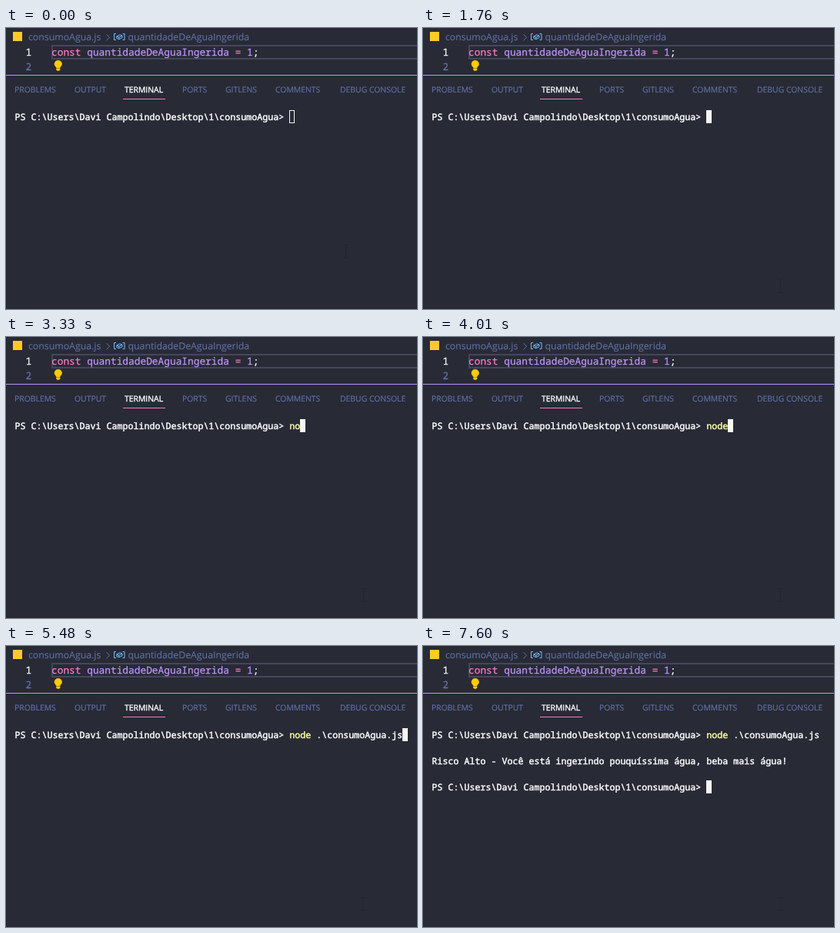
These frames come from a looping animation (534x366 px, 8000 ms). An HTML page:

```html
<!DOCTYPE html>
<html lang="pt">
<head>
<meta charset="utf-8">
<title>Terminal</title>
<style>
  html, body { margin: 0; width: 100%; height: 100%; overflow: hidden; background: #282a36; }
  svg { display: block; width: 534px; height: 366px; color: #f8f8f2; }
  text { white-space: pre; text-rendering: geometricPrecision; }
  text, tspan { fill: currentColor; stroke: currentColor; }
  .crumb, .tabs { font-family: "Open Sans", "Noto Sans", sans-serif; color: #6272a4; }
  .crumb { font-size: 12.3px; stroke-width: 0.1; }
  .tabs { font-size: 10.4px; stroke-width: 0.15; }
  .tabs .on { color: #fff; stroke-width: 0.35; }
  .code, .term { font-family: "Noto Sans Mono", "DejaVu Sans Mono", monospace; }
  .code { font-size: 12.83px; stroke-width: 0.25; }
  .term { font-size: 11.667px; stroke-width: 0.45; }
  .term text { color: #fff; }
  .key { color: #ff79c6; }
  .val { color: #bd93f9; }
  .dim { color: #6272a4; }
</style>
</head>
<body>
<svg viewBox="0 0 534 366">
  <rect width="534" height="366" fill="#282a36"/>

  <g class="crumb">
    <rect x="9" y="5" width="12" height="12" fill="#ffca28"/>
    <text x="29" y="16">consumoAgua.js</text>
    <path d="M130.500 8l4 4.200-4 4.200" fill="none" stroke="#6272a4" stroke-width="1"/>
    <g fill="none" stroke="#75beff" stroke-width="1">
      <path d="M143 7.500h-2.500v8h2.500M151.500 7.500h2.500v8h-2.500"/>
      <path d="M143.800 10.800l4.200-2 3 1.300v2.600l-4.200 2-3-1.300zl3 1.300 4.200-2M146.800 12.100v2.600"/>
    </g>
    <text x="158.500" y="16">quantidadeDeAguaIngerida</text>
  </g>

  <g class="code">
    <path d="M536 23H60V40H536" fill="none" stroke="#44475a" stroke-width="2"/>
    <text x="25.500" y="36">1</text>
    <text x="25.500" y="55" class="dim">2</text>
    <text x="59" y="36"><tspan class="key">const</tspan> <tspan class="val">quantidadeDeAguaIngerida</tspan> <tspan class="key">=</tspan> <tspan class="val">1</tspan>;</text>
    <path d="M65.500 52c0-1.700-2.500-2.300-2.500-5a4.800 4.800 0 0 1 9.600 0c0 2.700-2.500 3.300-2.500 5zM65.500 52.800h4.600v1.700l-1 1h-2.600l-1-1z" fill="#ffcc00" stroke="#ffcc00" stroke-width="0.500"/>
  </g>

  <rect y="61" width="534" height="1" fill="#bd93f9"/>
  <g class="tabs" id="tabs"></g>
  <rect x="152" y="92" width="55" height="1" fill="#ff79c6"/>

  <path id="pointer" d="M-3.500-8.500h3l.500.500.500-.500h3M0-8V8M-3.500 8.500h3l.500-.500.500.500h3" fill="none" stroke="#21232d"/>

  <g class="term">
    <text x="11.600" y="120"><tspan class="prompt"></tspan><tspan id="cmd"></tspan><tspan id="arg"></tspan></text>
    <text x="11.600" y="154" id="out">Risco Alto - Você está ingerindo pouquíssima água, beba mais água!</text>
    <text x="11.600" y="188" id="next"><tspan class="prompt"></tspan></text>
    <rect id="cursor" stroke="#f8f8f2" stroke-width="1"/>
  </g>
</svg>
<script>
const LOOP = 8000, LEFT = 11, TOP = 107, CELL = 7, ROW = 17;
const PROMPT = "PS C:\\Users\\Davi Campolindo\\Desktop\\1\\consumoAgua> ";
const FILE = " .\\consumoAgua.js";
const YELLOW = "#ffffa5", WHITE = "#f8f8f2";
const $ = id => document.getElementById(id);

const tabs = [["PROBLEMS", 11], ["OUTPUT", 89], ["TERMINAL", 154], ["PORTS", 229],
  ["GITLENS", 285], ["COMMENTS", 350], ["DEBUG CONSOLE", 434]];
for (const [label, x] of tabs) {
  const t = document.createElementNS("http://www.w3.org/2000/svg", "text");
  t.setAttribute("x", x);
  t.setAttribute("y", 84);
  if (label === "TERMINAL") t.setAttribute("class", "on");
  t.textContent = label;
  $("tabs").append(t);
}
document.querySelectorAll(".prompt").forEach(p => p.textContent = PROMPT);

// Each step changes only what it names; cursor is "hollow", "full" or "none".
const steps = [
  { at: 0, cmd: "", arg: "", color: YELLOW, cursor: "hollow", row: 0, col: 51, out: false, next: false },
  { at: 1760, cursor: "full" },
  { at: 3120, cmd: "n", cursor: "none" },
  { at: 3190, cursor: "full", col: 52 },
  { at: 3260, cmd: "no", cursor: "none" },
  { at: 3330, cursor: "full", col: 53 },
  { at: 3820, cmd: "nod", cursor: "none" },
  { at: 3920, cursor: "full", col: 54 },
  { at: 4010, cmd: "node", col: 55 },
  { at: 4280, cursor: "none" },
  { at: 4350, cursor: "full", col: 56 },
  { at: 5210, color: WHITE },
  { at: 5410, color: YELLOW, arg: FILE, cursor: "none" },
  { at: 5480, cursor: "full", col: 72 },
  { at: 7400, row: 1, col: 0 },
  { at: 7530, out: true, row: 4 },
  { at: 7600, next: true, col: 51 }
];
for (let i = 1; i < steps.length; i++) steps[i] = { ...steps[i - 1], ...steps[i] };

function setAttrs(el, attrs) {
  for (const k in attrs) el.setAttribute(k, attrs[k]);
}

function draw(s) {
  $("cmd").textContent = s.cmd;
  $("cmd").style.color = s.color;
  $("arg").textContent = s.arg;
  $("out").style.display = s.out ? "" : "none";
  $("next").style.display = s.next ? "" : "none";
  setAttrs($("cursor"), {
    x: LEFT + s.col * CELL + 0.5,
    y: TOP + s.row * ROW + 0.5,
    width: CELL - 1,
    height: ROW - 1,
    fill: s.cursor === "full" ? WHITE : "none",
    visibility: s.cursor === "none" ? "hidden" : "visible"
  });
}

// The mouse pointer slides down to its resting place in five jumps.
function movePointer(t) {
  const jump = Math.max(0, Math.min(5, Math.floor((t - 930) / 70) + 1));
  const x = 441.5 + Math.round(jump * 23 / 5), y = 291 + Math.round(jump * 45 / 5);
  $("pointer").setAttribute("transform", `translate(${x} ${y})`);
}

let shown = null;
function tick() {
  const t = performance.now() % LOOP;
  const s = steps.findLast(step => step.at <= t);
  if (s !== shown) draw(shown = s);
  movePointer(t);
  requestAnimationFrame(tick);
}
tick();
</script>
</body>
</html>
```
